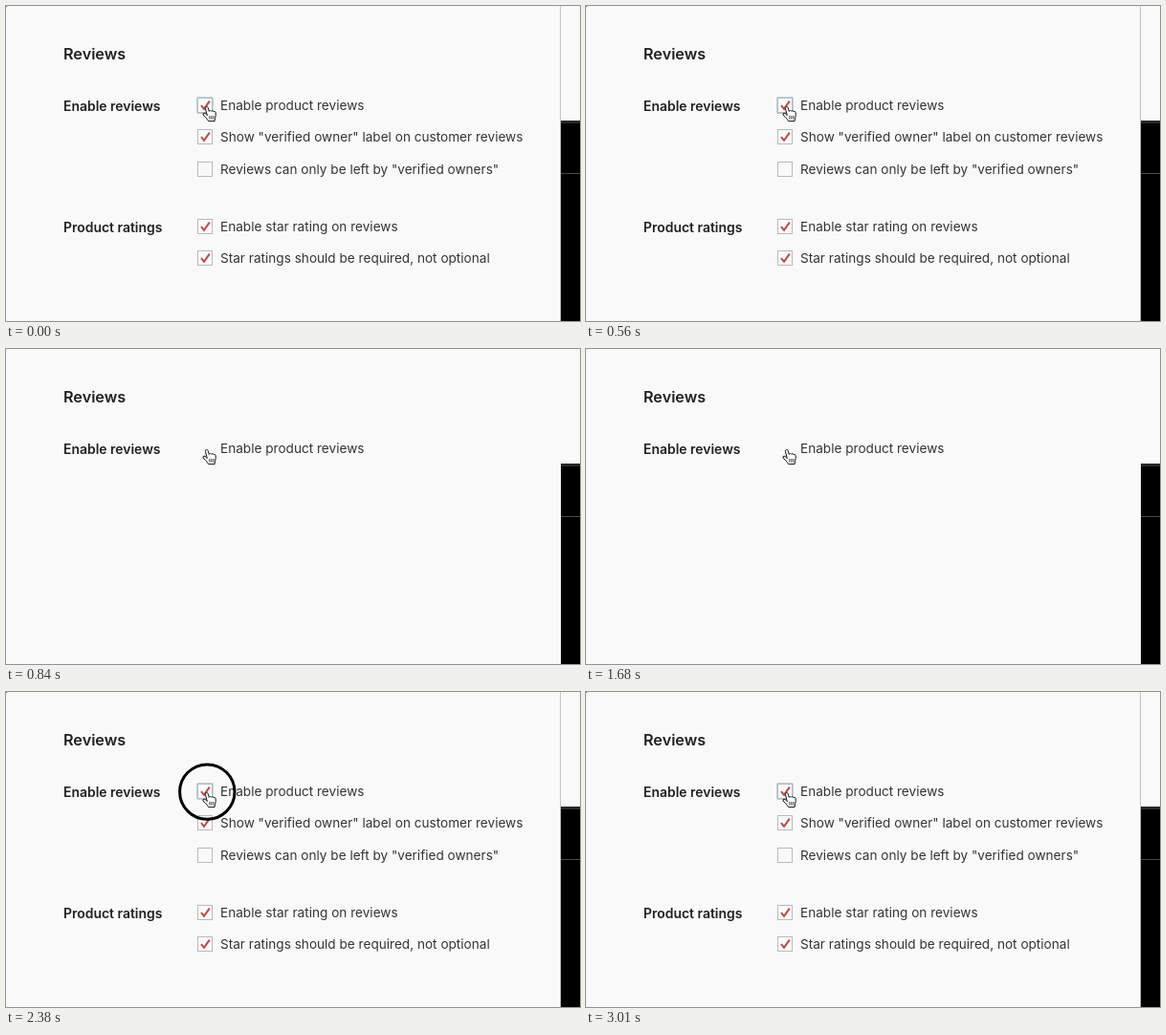
An HTML page that plays this animation: 600x330 px, repeating every 3150 ms.

```html
<!DOCTYPE html>
<html lang="en">
<head>
<meta charset="utf-8">
<title>Review settings</title>
<style>
  html, body { margin: 0; width: 100%; height: 100%; overflow: hidden; background: #f9f9f9; }
  svg { display: block; width: 600px; height: 330px; }
  text { font: 400 13.6px Inter, Roboto, sans-serif; fill: #343434; }
  .label { font-weight: 600; font-size: 13.95px; fill: #202020; }
  .title { font-weight: 600; font-size: 16.2px; fill: #202020; }
  .box { fill: #f9f9f9; stroke: #b8babc; }
  .focus .box { stroke: #749fb5; }
  .glow { fill: none; stroke: #749fb5; stroke-opacity: .45; }
  .tick { fill: none; stroke: #b5504e; stroke-width: 2.1; }
  .hand { fill: #fff; stroke: #111; stroke-linejoin: round; stroke-linecap: round; }
  .ring { fill: none; stroke: #000; stroke-width: 3; }
</style>
</head>
<body>
<svg viewBox="0 0 600 330">
  <defs>
    <rect id="box" class="box" x=".5" y=".5" width="15" height="15"/>
    <path id="tick" class="tick" d="M4 8.2 L7 11.8 L12.8 3.6"/>
  </defs>

  <rect width="600" height="330" fill="#f9f9f9"/>
  <rect x="580" y="120" width="20" height="210"/>
  <rect x="580" y="120" width="20" height="3" fill="#292929"/>
  <rect x="580" y="175" width="20" height="1" fill="#484848"/>

  <text class="title" x="60" y="56">Reviews</text>
  <text class="label" x="60" y="110">Enable reviews</text>
  <text x="224" y="109">Enable product reviews</text>

  <g id="details">
    <rect width="1" height="1" fill="#777"/>
    <rect x="579" width="1" height="330" fill="#c4c4c4"/>
    <g class="focus" transform="translate(200 96)">
      <rect class="glow" x="-.5" y="-.5" width="17" height="17" rx="1"/>
      <use href="#box"/><use href="#tick"/>
    </g>
    <text class="label" x="60" y="237">Product ratings</text>
    <g id="options"></g>
  </g>

  <circle id="ring" class="ring" cx="210.3" cy="104.6" r="28.7"/>
  <g class="hand">
    <path d="M210.2 114.2 L208.4 107.4 a1.4 1.4 0 0 1 2.7 -.9 L212.3 110.4
             a1.4 1.4 0 0 1 2.5 -.1 a1.3 1.3 0 0 1 2.3 .4 a1.2 1.2 0 0 1 2 .9
             q.6 3 -.6 5.8 l-.4 3.2 h-6.5 q-1.4 -2.4 -3 -4 l-2.6 -2.6
             q-.5 -1.6 1 -1.9 q1.2 .1 2.3 1.4 Z"/>
    <path d="M212.8 115.3 v3 M214.8 115.3 v3 M216.8 115.3 v3" stroke-width=".8"/>
  </g>
</svg>
<script>
const LOOP = 3150;
const HIDDEN = [840, 2380];
const PRESSES = [[630, 770], [2380, 2520]];

const byId = id => document.getElementById(id);
const within = (time, [start, end]) => time >= start && time < end;
const show = (id, visible) => { byId(id).style.display = visible ? "" : "none"; };

function option(y, label, checked) {
  return `<g transform="translate(200 ${y})"><use href="#box"/>` +
    (checked ? `<use href="#tick"/>` : "") +
    `<text x="24" y="13">${label}</text></g>`;
}

byId("options").innerHTML =
  option(129, 'Show "verified owner" label on customer reviews', true) +
  option(163, 'Reviews can only be left by "verified owners"', false) +
  option(223, "Enable star rating on reviews", true) +
  option(256, "Star ratings should be required, not optional", true);

const start = performance.now();

function draw() {
  const time = (performance.now() - start) % LOOP;
  show("details", !within(time, HIDDEN));
  show("ring", PRESSES.some(press => within(time, press)));
  requestAnimationFrame(draw);
}
draw();
</script>
</body>
</html>
```
